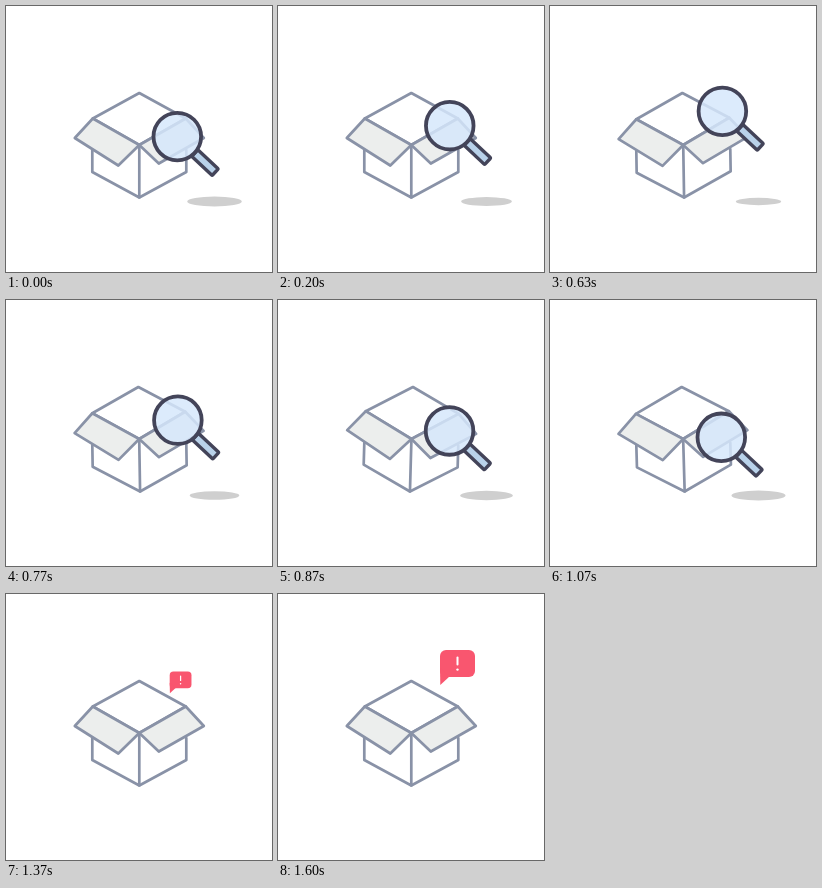
These frames come from a looping animation (266x266 px, 2510 ms). An HTML page with a canvas:

```html
<!DOCTYPE html>
<html lang="en">
<head>
<meta charset="utf-8">
<title>Empty box search</title>
<style>
  html, body { margin: 0; width: 100%; height: 100%; overflow: hidden; background: #fff; }
  canvas { display: block; width: 266px; height: 266px; }
</style>
</head>
<body>
<canvas id="stage"></canvas>
<script>
const SIZE = 266, LOOP = 2510;
const SEARCH_END = 33, WOBBLE_END = 36;
const BUBBLE_START = 31.4, BUBBLE_END = 48;
const LINE = '#8992a7', INK = '#434459', RED = '#f9566f';

const canvas = document.getElementById('stage');
const ctx = canvas.getContext('2d');
const ratio = window.devicePixelRatio || 1;
canvas.width = canvas.height = SIZE * ratio;

const mix = (a, b, k) => a + (b - a) * k;

function ease(step, from, to) {
  const k = Math.min(1, Math.max(0, (step - from) / (to - from)));
  return (1 - Math.cos(Math.PI * k)) / 2;
}

function poly(points, { fill, close = true, width = 2.7 } = {}) {
  ctx.beginPath();
  points.forEach(([x, y]) => ctx.lineTo(x, y));
  if (close) ctx.closePath();
  if (fill) {
    ctx.fillStyle = fill;
    ctx.fill();
  }
  ctx.strokeStyle = LINE;
  ctx.lineWidth = width;
  ctx.stroke();
}

function drawBox(angle) {
  ctx.save();
  ctx.translate(133.3, 144);
  ctx.rotate(angle);
  ctx.translate(-133.5, -144);
  poly([[86.5, 144], [86.5, 166], [133.5, 191.5], [180.5, 166], [180.5, 144]], { close: false });
  poly([[133.5, 139], [133.5, 191.5]], { close: false });
  poly([[133.5, 87], [180, 112.5], [133.5, 139], [87, 112.5]]);
  poly([[87, 112.5], [133.5, 139], [112.5, 159.5], [69, 132]], { fill: '#eceeed' });
  poly([[180, 112.5], [133.5, 139], [153, 157.5], [198, 132]], { fill: '#eceeed' });
  ctx.restore();
}

function drawShadow(lift) {
  ctx.fillStyle = '#cfcfcf';
  ctx.beginPath();
  ctx.ellipse(208.5, 195.5, 27.3 - 5.5 * lift, 5 - 1.6 * lift, 0, 0, Math.PI * 2);
  ctx.fill();
}

function drawLens(x, y) {
  ctx.save();
  ctx.translate(x, y);
  ctx.strokeStyle = INK;

  ctx.save();
  ctx.rotate(Math.PI * 0.24);
  ctx.beginPath();
  ctx.roundRect(24, -4.5, 28, 9, 1);
  ctx.fillStyle = '#b9d2ea';
  ctx.fill();
  ctx.lineWidth = 3.4;
  ctx.stroke();
  ctx.restore();

  ctx.beginPath();
  ctx.arc(0, 0, 23.8, 0, Math.PI * 2);
  ctx.fillStyle = 'rgba(214, 232, 252, 0.84)';
  ctx.fill();
  ctx.lineWidth = 3.8;
  ctx.stroke();
  ctx.restore();
}

function drawBubble(scale) {
  ctx.save();
  ctx.translate(166.5, 112.7);
  ctx.scale(scale, scale);
  ctx.translate(-166.5, -112.7);
  ctx.fillStyle = RED;
  ctx.beginPath();
  ctx.roundRect(162, 56, 35, 27, 6);
  ctx.fill();
  ctx.beginPath();
  ctx.moveTo(162, 74);
  ctx.lineTo(162.3, 91);
  ctx.lineTo(171.5, 82.5);
  ctx.fill();
  ctx.strokeStyle = ctx.fillStyle = '#fff';
  ctx.lineWidth = 2;
  ctx.beginPath();
  ctx.moveTo(179.5, 63.5);
  ctx.lineTo(179.5, 70.5);
  ctx.stroke();
  ctx.beginPath();
  ctx.arc(179.5, 75.6, 1.2, 0, Math.PI * 2);
  ctx.fill();
  ctx.restore();
}

function draw(step) {
  ctx.setTransform(ratio, 0, 0, ratio, 0, 0);
  ctx.lineJoin = ctx.lineCap = 'round';
  ctx.fillStyle = '#fff';
  ctx.fillRect(0, 0, SIZE, SIZE);

  const wobble = step < WOBBLE_END ? Math.sin(step * Math.PI / 6) : 0;
  drawBox(0.033 * wobble);

  if (step < SEARCH_END) {
    const rise = ease(step, 0, 15), fall = ease(step, 15, 30);
    drawShadow((1 - Math.cos(step * Math.PI / 15)) / 2);
    drawLens(171.3 + 1.3 * rise - 1.3 * fall, mix(mix(130.6, 99, rise), 137.3, fall));
  } else {
    drawBubble(ease(step, BUBBLE_START, BUBBLE_END));
  }
}

// The motion runs in 30 discrete steps per second.
function tick() {
  const time = performance.now() % LOOP;
  draw(Math.floor(time * 0.03 + 0.2));
  requestAnimationFrame(tick);
}
tick();
</script>
</body>
</html>
```
